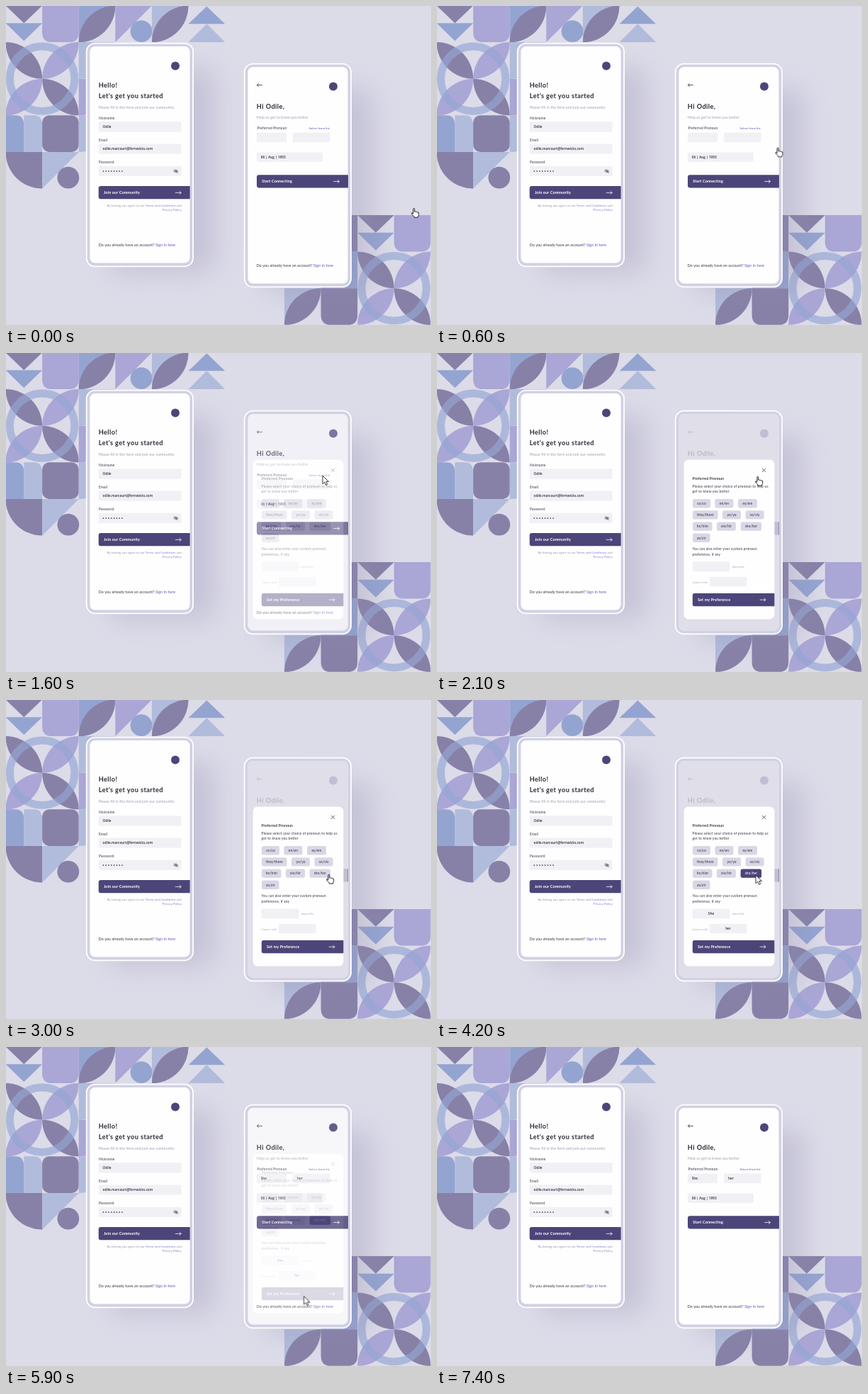
An HTML page that plays this animation: 600 by 450 pixels, repeating every 8300 ms.

```html
<!DOCTYPE html>
<html lang="en">
<head>
<meta charset="utf-8">
<title>Sign-up screens</title>
<style>
html, body { margin: 0; width: 100%; height: 100%; overflow: hidden; background: #dcdbe8; }
svg { display: block; width: 100%; height: 100%; }
text { font: 500 5.1px Lato, sans-serif; fill: #45434f; }
.head { font-size: 9.2px; font-weight: 700; letter-spacing: .42px; fill: #2a2834; }
.sub { fill: #a5a3b6; letter-spacing: .12px; }
.label { font-size: 4.8px; letter-spacing: .17px; }
.value { font: 600 4.7px "Open Sans", sans-serif; fill: #2d2b38; }
.title { font-size: 5.4px; font-weight: 700; }
.cta { font-size: 5.5px; font-weight: 700; fill: #fff; letter-spacing: .1px; }
.foot { font-size: 5.3px; letter-spacing: .08px; }
.fine { font-size: 4.4px; fill: #9b99ae; text-anchor: end; letter-spacing: .04px; }
.link { fill: #6a62b8; }
.soft { fill: #8d86d3; }
.script { font: italic 4px "Liberation Serif", serif; fill: #a3a1b0; }
.chip text { font-size: 4.9px; text-anchor: middle; letter-spacing: .1px; }
.mid { text-anchor: middle; }
.field { fill: #f1f0f5; }
.a { fill: #8781a8; } .b { fill: #aaa6d6; } .c { fill: #94a4d1; } .d { fill: #b1bbdb; }
.ink { fill: #4c4579; }
.line { fill: none; stroke: #2b2937; stroke-width: .75; stroke-linecap: round; stroke-linejoin: round; }
.thin { stroke-width: .55; }
.white { stroke: #fff; }

.sheet, .picked, .cursor, .hand, .arrow { animation: 8300ms linear infinite; }
.sheet { animation-name: sheet; }
.picked { animation-name: picked; }
.cursor { animation-name: travel; }
.hand { animation-name: hand; animation-timing-function: step-end; }
.arrow { animation-name: arrow; animation-timing-function: step-end; }

@keyframes sheet {
  0%, 18.07% { opacity: 0; animation-timing-function: cubic-bezier(.1, .4, .5, 1); }
  24.8%, 66.26% { opacity: 1; animation-timing-function: cubic-bezier(.1, .4, .5, 1); }
  75.9%, 100% { opacity: 0; }
}
@keyframes picked {
  0%, 46.98% { opacity: 0; animation-timing-function: ease-out; }
  50.5%, 100% { opacity: 1; }
}
@keyframes travel {
  0% { transform: translate(570px, 284px); animation-timing-function: ease-in-out; }
  10.84%, 27.71% { transform: translate(447px, 173px); animation-timing-function: ease-in-out; }
  37.35%, 54.22% { transform: translate(450px, 247px); animation-timing-function: ease-in-out; }
  60.8%, 85.54% { transform: translate(420.5px, 351.5px); animation-timing-function: ease-in; }
  89.1%, 100% { transform: translate(514px, 454px); }
}
@keyframes hand {
  0%, 25.18%, 52.9%, 75.8% { opacity: 1; }
  15.66%, 46.98%, 66.26% { opacity: 0; }
}
@keyframes arrow {
  0%, 25.18%, 52.9%, 75.8% { opacity: 0; }
  15.66%, 46.98%, 66.26% { opacity: 1; }
}
</style>
</head>
<body>
<svg viewBox="0 0 600 450" preserveAspectRatio="none">
  <defs>
    <filter id="blur" x="-50%" y="-30%" width="200%" height="160%"><feGaussianBlur stdDeviation="18"/></filter>
    <path id="petal" d="M0 0A52 52 0 0 1 52 52A52 52 0 0 1 0 0"/>
    <path id="crossPetal" d="M52 0A52 52 0 0 1 0 52A52 52 0 0 1 52 0"/>
    <path id="quarter" d="M0 0H52A52 52 0 0 1 0 52Z"/>
    <path id="bowl" d="M0 0H52V38Q52 52 38 52H14Q0 52 0 38Z"/>
    <path id="down" d="M0 0H52L26 25Z"/>
    <path id="next" class="line white" d="M0 0H8M5.7-2L8 0L5.7 2"/>
    <path id="bar" class="ink" d="M3 0H129V18.2H3Q0 18.2 0 15.2V3Q0 0 3 0Z"/>
    <g id="rosette">
      <use href="#petal" class="a"/>
      <use href="#crossPetal" class="b" x="52"/>
      <use href="#crossPetal" class="b" y="52"/>
      <use href="#petal" class="a" x="52" y="52"/>
      <circle cx="52" cy="52" r="46" fill="none" stroke="#94a6d4" stroke-opacity=".65" stroke-width="11"/>
    </g>
    <g id="phone">
      <rect x="145" y="88" width="150" height="288" rx="20" fill="#8f8bad" opacity=".3" filter="url(#blur)"/>
      <rect x="113.7" y="52.7" width="150.4" height="314.6" rx="12" fill="#d2d1e3" stroke="#fff" stroke-width="1.8"/>
      <rect x="118.4" y="57" width="141.2" height="305.4" rx="7.5" fill="#fefeff"/>
      <circle cx="239" cy="84.5" r="6" class="ink"/>
      <text x="130.7" y="339.2" class="foot">Do you already have an account? <tspan class="link">Sign in here</tspan></text>
    </g>
  </defs>

  <rect width="600" height="450" fill="#dcdbe8"/>

  <g transform="translate(-.5 -.5) scale(.9925)">
    <use href="#down" class="a"/>
    <use href="#down" class="c" y="25"/>
    <use href="#bowl" class="b" x="52"/>
    <use href="#quarter" class="c" x="104"/>
    <use href="#crossPetal" class="a" x="104"/>
    <path class="b" d="M156 0H208L156 52Z"/>
    <circle class="c" cx="193" cy="36.5" r="15.5"/>
    <use href="#quarter" class="d" x="208"/>
    <use href="#crossPetal" class="a" x="208"/>
    <path class="c" d="M286 1L312 26H260Z"/>
    <path class="d" d="M286 26L312 52H260Z"/>
    <use href="#rosette" y="52"/>
    <use href="#quarter" class="d" x="104" y="52"/>
    <use href="#quarter" class="b" x="104" y="104"/>
    <path class="c" d="M0 156H14Q26 156 26 170V208H0Z"/>
    <path class="d" d="M26 156H40Q52 156 52 170V208H26Z"/>
    <rect class="a" x="52" y="156" width="52" height="52" rx="10"/>
    <use href="#quarter" class="d" x="104" y="156"/>
    <use href="#quarter" class="a" transform="translate(52 208) scale(-1 1)"/>
    <path class="d" d="M52 208H104L52 260Z"/>
    <circle class="a" cx="89" cy="244.5" r="15.5"/>
  </g>

  <g transform="translate(393 295) scale(.9925)">
    <rect class="a" x="52" width="52" height="52"/>
    <use href="#down" class="a" x="104"/>
    <use href="#down" class="c" x="104" y="25"/>
    <use href="#bowl" class="b" x="156"/>
    <rect class="c" x="52" y="52" width="52" height="52"/>
    <use href="#rosette" x="104" y="52"/>
    <use href="#quarter" class="d" y="104"/>
    <use href="#crossPetal" class="a" y="104"/>
    <use href="#bowl" class="a" x="52" y="104"/>
  </g>

  <use href="#phone"/>
  <text x="130.7" y="115" class="head">Hello!</text>
  <text x="130.7" y="130.3" class="head">Let's get you started</text>
  <text x="130.7" y="144.7" class="sub">Please fill in the form and join our community</text>
  <text x="131" y="159.5" class="label">Nickname</text>
  <text x="131" y="190.5" class="label">Email</text>
  <text x="131" y="221.6" class="label">Password</text>
  <g class="field">
    <rect x="130.7" y="163.2" width="117" height="14.2" rx="2"/>
    <rect x="130.7" y="194.4" width="117" height="14.2" rx="2"/>
    <rect x="130.7" y="225.8" width="117" height="14.2" rx="2"/>
  </g>
  <text x="136.6" y="172" class="value">Odile</text>
  <text x="136.6" y="203.2" class="value">odile.marcourt@fernwicks.com</text>
  <path d="M137.4 233H165" stroke="#2b2937" stroke-width="1.7" stroke-linecap="round" stroke-dasharray="0 3.8"/>
  <g class="line thin">
    <path d="M237 233Q240 229.2 243 233Q240 236.8 237 233ZM237.4 230.3L242.6 235.7"/>
    <circle cx="240" cy="233" r=".8"/>
  </g>
  <use href="#bar" x="130.7" y="254"/>
  <text x="138" y="265.2" class="cta">Join our Community</text>
  <use href="#next" x="239.2" y="263.4"/>
  <text x="247.8" y="282.7" class="fine">By Joining you agree to our <tspan class="soft">Terms and Conditions</tspan> and</text>
  <text x="247.8" y="289" class="fine soft">Privacy Policy</text>

  <use href="#phone" x="223" y="29"/>
  <path class="line" d="M361.5 111.5H354.3M356.7 109.2L354.3 111.5L356.7 113.8"/>
  <text x="353.8" y="144.6" class="head">Hi Odile,</text>
  <text x="353.8" y="159" class="sub">Help us get to know you better</text>
  <text x="354.4" y="174.4" class="label">Preferred Pronoun</text>
  <text x="457" y="174.2" class="fine link">Select from list</text>
  <g class="field">
    <rect x="353.9" y="178.6" width="42.3" height="13.6" rx="2"/>
    <rect x="405" y="178.6" width="52.6" height="13.6" rx="2"/>
    <rect x="353.9" y="206.4" width="93" height="13.6" rx="2"/>
  </g>
  <text x="359.8" y="214.9" class="value">06 | Aug | 1993</text>
  <g class="picked">
    <text x="359.8" y="187" class="value">She</text>
    <text x="411" y="187" class="value">her</text>
  </g>
  <use href="#bar" x="354" y="238.2"/>
  <text x="361.2" y="249.3" class="cta">Start Connecting</text>
  <use href="#next" x="462.6" y="247.5"/>

  <g class="sheet">
    <rect x="341.4" y="86" width="141.2" height="305.4" rx="7.5" fill="#d9d8e5" opacity=".83"/>
    <rect x="348.6" y="150.5" width="127.8" height="225" rx="6.5" fill="#fefeff"/>
    <path class="line" d="M459.3 163.2L463.7 167.6M463.7 163.2L459.3 167.6"/>
    <text x="360.6" y="178.6" class="title">Preferred Pronoun</text>
    <text x="360.6" y="190" class="label">Please select your choice of pronoun to help us</text>
    <text x="360.6" y="197.4" class="label">get to know you better</text>
    <g id="chips"></g>
    <text x="360.6" y="277.8" class="label">You can also enter your custom pronoun</text>
    <text x="360.6" y="285.9" class="label">preference, if any</text>
    <rect class="field" x="360.7" y="294.6" width="52.6" height="13.6" rx="2"/>
    <text x="416.5" y="303" class="script">shared like</text>
    <text x="360.6" y="324.6" class="script">Connect with</text>
    <rect class="field" x="384.8" y="315.8" width="52.6" height="13.4" rx="2"/>
    <use href="#bar" transform="translate(360.8 339) scale(.896 1)"/>
    <text x="368" y="350.2" class="cta">Set my Preference</text>
    <use href="#next" x="456" y="348.2"/>
    <g class="picked">
      <g id="chosen"></g>
      <text x="387" y="303" class="value mid">She</text>
      <text x="411" y="324.4" class="value mid">her</text>
    </g>
  </g>

  <g class="cursor">
    <path class="arrow" d="M0 0V11.6L2.7 9.2L4.6 13.4L6.7 12.4L4.8 8.4H8.4Z" fill="#fff" stroke="#222" stroke-width=".9" stroke-linejoin="round"/>
    <path class="hand" d="M4.9 9.1V2.6Q4.9 1.4 5.8 1.4Q6.8 1.4 6.8 2.6V6.2Q8 5.4 8.7 6.5Q10 5.8 10.6 6.9Q12.6 6.4 12.7 8.2V10.2Q12.6 12 11.7 12.8V14.2H6.3V13Q4.4 11.6 2.6 8.8Q2.5 7.2 4 8.1Z" fill="#fff" stroke="#1d1b26" stroke-width="1" stroke-linejoin="round"/>
  </g>
</svg>
<script>
const chip = (x, y, width, label, box = "#d9d7e5", ink = "#3c3a48") =>
  `<g class="chip"><rect x="${x}" y="${y}" width="${width}" height="12.4" rx="2.5" fill="${box}"/>` +
  `<text x="${x + width / 2}" y="${y + 7.9}" style="fill:${ink}">${label}</text></g>`;

const rows = [
  [[361, 25, "co/co"], [392.4, 26, "en/en"], [425, 27, "ey/em"]],
  [[361, 35.5, "they/them"], [403, 26, "yo/yo"], [435.6, 26, "ve/vis"]],
  [[361, 27.5, "he/him"], [395, 27, "xie/hir"], [428.7, 29.4, "she/her"]],
  [[361, 24.5, "ze/zir"]],
];
document.getElementById("chips").innerHTML = rows.map((row, i) =>
  row.map(([x, width, label]) => chip(x, 206 + i * 16.2, width, label)).join("")).join("");
document.getElementById("chosen").innerHTML = chip(428.7, 238.4, 29.4, "she/her", "#4c4579", "#fff");
</script>
</body>
</html>
```
